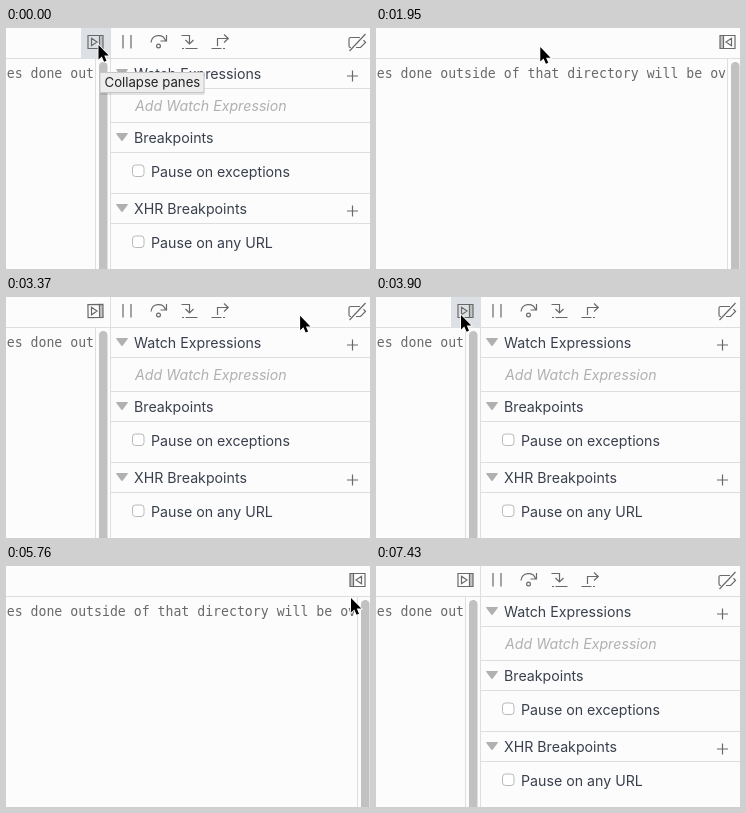
An HTML page for the animation above (8240 ms loop, 364 px wide and 241 px high).

```html
<!DOCTYPE html>
<html lang="en">
<head>
<meta charset="utf-8">
<title>Collapsing panes</title>
<style>
  html, body { margin: 0; width: 100%; height: 100%; overflow: hidden; background: #fcfcfc; }
  svg { display: block; }
  text { font: 14.2px Inter, "Open Sans", sans-serif; fill: #393f4c; white-space: pre; }
  .code { font: 13.2px "DejaVu Sans Mono", monospace; fill: #696969; }
  .hint { font-style: italic; fill: #b0b0b0; }
  .tip { font-size: 13.2px; fill: #222; }
  .line { stroke: #dedede; }
  .icon { fill: none; stroke: #696969; stroke-width: 1.2; }
  .box { fill: #fff; stroke: #b9b9b9; }
</style>
</head>
<body>
<svg width="364" height="241" viewBox="0 0 364 241">
  <defs>
    <path id="twisty" d="M.8 0H11.2Q12.4 0 11.7 1L6.8 7.6Q6 8.6 5.2 7.6L.3 1Q-.4 0 .8 0Z" fill="#b0b0b0"/>
    <path id="plus" class="icon" d="M-5.5 0H5.5M0-5.5V5.5"/>
    <rect id="check" class="box" x="126.5" y="-6" width="11.5" height="11.5" rx="3"/>
  </defs>

  <rect width="364" height="241" fill="#fcfcfc"/>
  <text class="code" x=".7" y="50">es done outside of that directory will be ov</text>

  <g id="edge">
    <rect x="90" y="31" width="290" height="210" fill="#fcfcfc"/>
    <path class="line" d="M89.5 31V241"/>
    <rect x="93" y="34" width="8.5" height="230" rx="4.2" fill="#c1c1c1"/>
  </g>

  <g id="panel">
    <rect x="104" width="260" height="241" fill="#fcfcfc"/>
    <path class="line" d="M104.5 0V241M105 60.5H364M105 94.5H364M105 124.5H364M105 165.5H364M105 195.5H364"/>
    <use href="#twisty" x="110" y="41"/>
    <use href="#twisty" x="110" y="105"/>
    <use href="#twisty" x="110" y="176"/>
    <text x="128" y="50.5">Watch Expressions</text>
    <text x="129" y="82.5" class="hint">Add Watch Expression</text>
    <text x="128" y="114.5">Breakpoints</text>
    <text x="145" y="148.5">Pause on exceptions</text>
    <text x="128" y="185.5">XHR Breakpoints</text>
    <text x="145" y="219.5">Pause on any URL</text>
    <use href="#plus" x="346.5" y="48"/>
    <use href="#plus" x="346.5" y="183"/>
    <use href="#check" y="143"/>
    <use href="#check" y="214"/>
  </g>

  <rect id="hover" height="30" fill="#dde1e5"/>
  <path class="line" d="M0 30.5H364"/>

  <g id="tools" class="icon">
    <path d="M117 7V20.5M125 7V20.5"/>
    <path d="M145 14.5C146 6 157 5.500 159.500 12.500M160.500 7V13H154.500"/>
    <circle cx="152.500" cy="18" r="1.900"/>
    <path d="M175.500 7.500H183.500V15.500M179.500 12L183.500 16L187.500 12M176 20.500H178M179.500 20.500H191.500"/>
    <path d="M211.500 18V10.500H222M218 6.500L222.300 10.500L218 14.500M205.500 20.500H215.500M217 20.500H219"/>
    <path d="M354 9.500H344.500Q343 9.500 343 11V18Q343 19.500 344.500 19.500H345M350 19.500H354.500L359.500 14.500L357.500 12.200M343.500 23L359.500 6"/>
  </g>

  <g id="toggle" class="icon">
    <rect x="4" y="-6.500" width="3.500" height="13" fill="#c4c4c4" stroke="none"/>
    <path d="M-7.500-6.500H7.500V6.500H-7.500ZM4-6.500V6.500M-4-3.700L1.500 0L-4 3.700Z"/>
  </g>

  <g id="tip">
    <rect x="2" y="29" width="104" height="21" fill="#000" opacity=".1"/>
    <rect x="1.500" y="27.500" width="104" height="20" fill="#ededed" stroke="#c6c6c6"/>
    <text class="tip" x="6" y="42">Collapse panes</text>
  </g>

  <g id="cursor">
    <circle id="ring" r="9.500" fill="none" stroke="#333" stroke-width="1.500"/>
    <path d="M0 0V14.500L3.300 11.500L5.600 16.700L8 15.700L5.800 10.600H10.300Z" stroke="#fff" stroke-width="1.600" paint-order="stroke"/>
  </g>
</svg>
<script>
const LOOP = 8240, STEP = 88;
const $ = id => document.getElementById(id);
const [edge, panel, hover, tools, toggle, tip, cursor, ring] =
  ['edge', 'panel', 'hover', 'tools', 'toggle', 'tip', 'cursor', 'ring'].map($);

const inOut = n => p => p < .5 ? (2 * p) ** n / 2 : 1 - (2 - 2 * p) ** n / 2;
const easeOut = p => 1 - (1 - p) ** 2.8;
const easeIn = p => p * p;
const linear = p => p;

// start, end, from x, from y, to x, to y, easing
const moves = [
  [0, 1, 92.5, 17, 92.5, 17, linear],
  [1780, 2570, 92.5, 21, 348, 14, easeOut],
  [3100, 3900, 348, 19, 85, 18, inOut(2.2)],
  [4890, 5670, 86, 22, 345, 32, inOut(3)],
  [5760, 6020, 345, 32, 352.5, 27.5, linear],
  [6380, 7170, 351.5, 27.5, 312, 190, easeIn],
  [7260, 7430, 310, 218, 308, 262, linear]
];
// start, collapsed, delay before the icon turns
const flips = [[-1000, 0, 0], [1340, 1, 25], [3100, 0, 25], [4890, 1, 25], [6380, 0, 40]];
const clicks = [[1070, 1340], [2930, 3100], [4710, 4890], [6200, 6380]];

const latest = (list, t) => list.filter(e => e[0] <= t).pop();
const show = (el, on) => el.setAttribute('opacity', +on);
const place = (el, x, y, turn = 0) =>
  el.setAttribute('transform', `translate(${x} ${y}) rotate(${turn})`);

function pointer(t) {
  const [start, end, x0, y0, x1, y1, ease] = latest(moves, t);
  const count = Math.max(1, Math.round((end - start) / STEP));
  const step = Math.floor((t - start) * count / (end - start) + .02);
  const p = ease(Math.min(1, step / count));
  return [x0 + (x1 - x0) * p, y0 + (y1 - y0) * p];
}

function hovered(x, y, collapsed) {
  if (y >= 30) return [0, 0];
  if (x >= 337) return [337, 27];
  if (collapsed || x < 75 || x >= 230) return [0, 0];
  return x < 104 ? [75, 29] : [105 + 31 * Math.floor((x - 105) / 31), 31];
}

function draw(t) {
  const [start, collapsed, delay] = latest(flips, t);
  const shift = collapsed * 262;
  const elapsed = Math.floor((t - start + 8) / STEP) * STEP - delay;
  const turned = inOut(2)(Math.min(1, Math.max(0, elapsed / 250)));
  place(edge, shift, 0);
  place(toggle, collapsed ? 351.5 : 89.5, 14, -180 * (collapsed ? turned : 1 - turned));
  show(panel, !collapsed);
  show(tools, !collapsed);

  const [x, y] = pointer(t);
  place(cursor, x, y);
  show(ring, clicks.some(([a, b]) => t >= a && t < b));

  const [left, width] = hovered(x, y, collapsed);
  hover.setAttribute('x', left);
  hover.setAttribute('width', width);

  place(tip, x, y);
  const first = t < 1070 ? 1 : t < 1160 ? .4 : 0;
  show(tip, t >= 4440 && t < 4710 ? 1 : first);
}

const begin = performance.now();
(function frame() {
  draw((performance.now() - begin) % LOOP);
  requestAnimationFrame(frame);
})();
</script>
</body>
</html>
```
